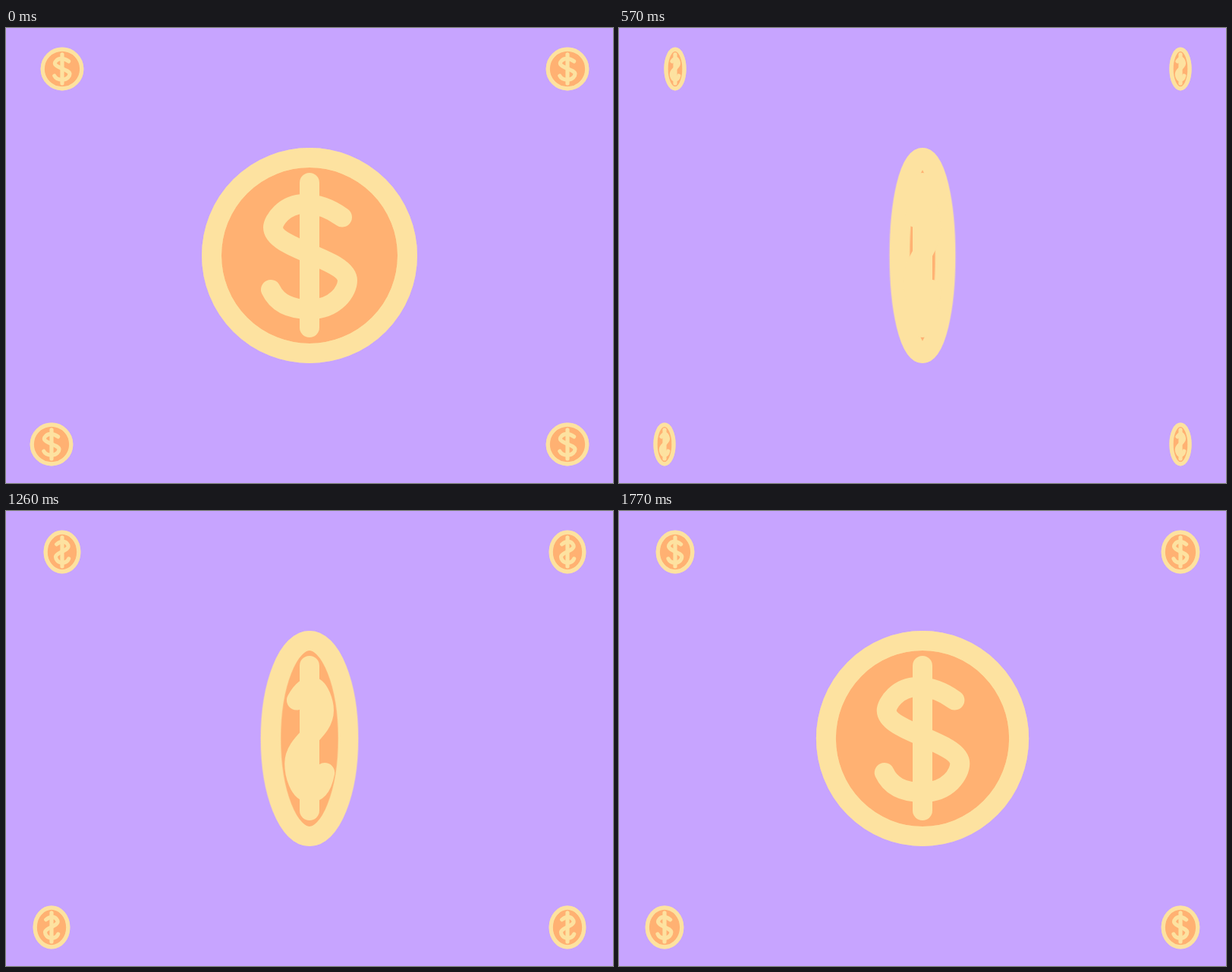
Write an HTML page with a canvas that moves like this. It is 800x600 px and loops after 1800 ms.

```html
<!DOCTYPE html>
<html lang="en">
<head>
<meta charset="utf-8">
<title>Spinning coins</title>
<style>
  html, body { margin: 0; width: 100%; height: 100%; overflow: hidden; background: #c7a4ff; }
  canvas { display: block; }
</style>
</head>
<body>
<canvas id="stage" width="800" height="600"></canvas>
<script>
const ctx = document.getElementById('stage').getContext('2d');
const LOOP = 1800, STEP = 30;
const BG = '#c7a4ff', GOLD = '#fde2a0', ORANGE = '#ffb172';
const RADIUS = 129, LINE = 26;

// The S of the dollar sign: start point, then cubic segments.
const S_START = [43, -50.5];
const S_CURVES = [
  [30, -60, 13, -68, -7, -68],
  [-33, -68, -48, -46, -48, -37],
  [-48, -8.5, 50, 4, 50, 33],
  [50, 46, 35, 71, 0, 71],
  [-27, 71, -43, 62, -51, 45]
];

const SMALL_COINS = [[74, 54], [740, 54], [60, 549], [740, 549]];

// Horizontal stretch over time: [ms, value].
const BIG_KEYS = [[0, 1], [900, -1], [1800, 1]];
const SMALL_KEYS = [[0, 1], [450, -1], [900, 1], [1290, -1], [1800, 1]];

const linear = p => p;

// Cubic-bezier easing with control points (x1, 0) and (x2, 1).
function bezier(x1, x2) {
  return p => {
    let lo = 0, hi = 1;
    for (let i = 0; i < 30; i++) {
      const s = (lo + hi) / 2, r = 1 - s;
      const x = 3 * x1 * s * r * r + 3 * x2 * s * s * r + s * s * s;
      if (x < p) lo = s; else hi = s;
    }
    return lo * lo * (3 - 2 * lo);
  };
}
const flip = bezier(0.343, 0.789);

function valueAt(keys, t, ease) {
  const i = keys.findIndex((k, n) => n > 0 && t < k[0]);
  const [t0, a] = keys[i - 1], [t1, b] = keys[i];
  return a + (b - a) * ease((t - t0) / (t1 - t0));
}

function oval(rx) {
  ctx.beginPath();
  ctx.ellipse(0, 0, Math.max(rx, 0.01), RADIUS, 0, 0, Math.PI * 2);
}

// Only the outlines are squeezed by sx; line widths stay constant.
function drawCoin(x, y, size, sx) {
  ctx.save();
  ctx.translate(x, y);
  ctx.scale(size, size);
  ctx.lineWidth = LINE;
  ctx.lineCap = ctx.lineJoin = 'round';
  ctx.strokeStyle = GOLD;
  ctx.fillStyle = ORANGE;

  const rx = RADIUS * Math.abs(sx);
  oval(rx);
  ctx.fill();
  ctx.stroke();

  // Soft sides while the coin is turned.
  const soft = 1.5 * (1 - Math.abs(sx));
  ctx.globalAlpha = 0.35;
  for (const d of [-soft, soft]) {
    oval(rx + d);
    ctx.stroke();
  }
  ctx.globalAlpha = 1;

  ctx.beginPath();
  ctx.moveTo(S_START[0] * sx, S_START[1]);
  for (const [a, b, c, d, e, f] of S_CURVES) {
    ctx.bezierCurveTo(a * sx, b, c * sx, d, e * sx, f);
  }
  ctx.stroke();

  ctx.beginPath();
  ctx.moveTo(0, -96);
  ctx.lineTo(0, 95);
  ctx.stroke();
  ctx.restore();
}

function draw(ms) {
  const t = Math.floor((ms + 1) / STEP) * STEP % LOOP;
  ctx.fillStyle = BG;
  ctx.fillRect(0, 0, 800, 600);
  drawCoin(400, 300, 1, valueAt(BIG_KEYS, t, flip));
  const sx = valueAt(SMALL_KEYS, t, linear);
  for (const [x, y] of SMALL_COINS) drawCoin(x, y, 0.2, sx);
}

const start = performance.now();
function tick() {
  draw(performance.now() - start);
  requestAnimationFrame(tick);
}
tick();
</script>
</body>
</html>
```
